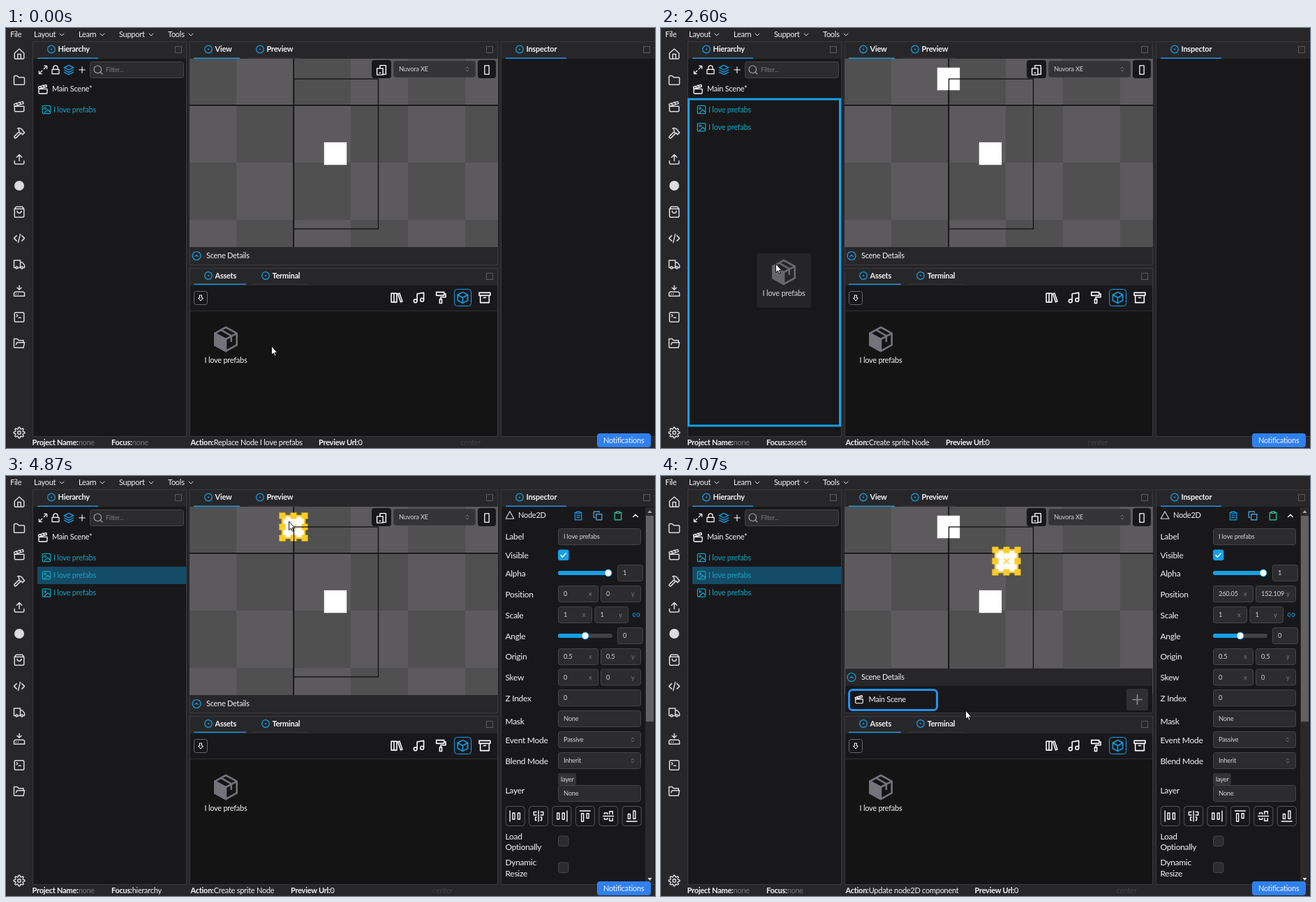
Write an HTML page that moves like this. It is 930 by 602 pixels and loops after 7800 ms.

```html
<!DOCTYPE html>
<html lang="en">
<head>
<meta charset="utf-8">
<title>Scene editor</title>
<style>
html, body { margin: 0; width: 100%; height: 100%; overflow: hidden; background: #27272a; }
svg { display: block; width: 100%; height: 100%; }
text { font: 11px Lato, "Open Sans", sans-serif; letter-spacing: -.024em; fill: #f4f4f5; white-space: pre; }
.b { font-weight: 700; }
.n { font-weight: 400; }
.s { font-size: 9.3px; fill: #d4d4d8; }
.l { font-size: 12px; }
.dim { fill: #77777c; }
.cy { fill: #10a5bf; }
</style>
</head>
<body>
<svg id="stage" viewBox="0 0 930 602" xmlns="http://www.w3.org/2000/svg"></svg>
<script>
const BLUE = '#16a0e6', BAR = '#27272a', BODY = '#18181b', EDGE = '#3a3a3d', FIELD = '#2c2c2f', YELLOW = '#ffcb25';

const disc = (x, y, r) => `M${x + r} ${y}a${r} ${r} 0 1 1 ${-2 * r} 0 ${r} ${r} 0 0 1 ${2 * r} 0`;
const box = (x, y, w, h) => `M${x} ${y}h${w}v${h}h${-w}z`;

function gear() {
  let d = '';
  for (let i = 0; i < 64; i++) {
    const a = i * Math.PI / 32, r = 9 + 1.5 * Math.tanh(2.5 * Math.cos(8 * a));
    d += (i ? 'L' : 'M') + (12 + r * Math.cos(a)).toFixed(2) + ' ' + (12 + r * Math.sin(a)).toFixed(2);
  }
  return d + 'Z' + disc(12, 12, 3);
}

// Icons on a 24 unit grid
const icons = {
  home: 'M9 21v-9h6v9M3 10l9-8 9 8v9a2 2 0 0 1-2 2H5a2 2 0 0 1-2-2z',
  folder: 'M4 20a2 2 0 0 1-2-2V5a2 2 0 0 1 2-2h4l3 3h9a2 2 0 0 1 2 2v10a2 2 0 0 1-2 2z',
  clap: 'M20 6 3 11l-1-4 17-5zM6 5l3 4M12 3l3 4M3 11h18v8a2 2 0 0 1-2 2H5a2 2 0 0 1-2-2z',
  hammer: 'M15 12l-9 9a2 2 0 0 1-3-3l9-9M18 15l4-4-3-3V7l-3-3q-3-2-7-1 3 2 3 5v2l2 2h2z',
  upload: 'M21 15v4a2 2 0 0 1-2 2H5a2 2 0 0 1-2-2v-4M17 8l-5-5-5 5M12 3v12',
  bag: 'M6 2 3 6v14a2 2 0 0 0 2 2h14a2 2 0 0 0 2-2V6l-3-4zM3 6h18M16 10a4 4 0 0 1-8 0',
  code: 'M17 17l5-5-5-5M7 7l-5 5 5 5M14 4l-4 16',
  truck: 'M5 18H2V4h12v14M15 18H9M19 18h3v-5l-4-5h-4' + disc(17, 18, 2) + disc(7, 18, 2),
  drive: 'M12 2v8M16 6l-4 4-4-4M4 14h16l2 2v6H2v-6zM6 18h.1M10 18h.1',
  term: 'M7 11l2-2-2-2M11 13h4M5 3h14a2 2 0 0 1 2 2v14a2 2 0 0 1-2 2H5a2 2 0 0 1-2-2V5a2 2 0 0 1 2-2z',
  open: 'M6 14l2-4h14l-2 10H4a2 2 0 0 1-2-2V3h6l3 3h9v4',
  gear: gear(),
  expand: 'M15 3h6v6M21 3l-7 7M9 21H3v-6M3 21l7-7',
  lock: 'M4 11h16v10H4zM7 11V7a5 5 0 0 1 10 0v4',
  layers: 'M12 2l10 5-10 5L2 7zM2 12l10 5 10-5M2 17l10 5 10-5',
  plus: 'M12 4v16M4 12h16',
  search: disc(11, 11, 8) + 'M21 21l-4.5-4.5',
  image: 'M5 3h14a2 2 0 0 1 2 2v14a2 2 0 0 1-2 2H5a2 2 0 0 1-2-2V5a2 2 0 0 1 2-2zM6 21l9-9 6 6' + disc(9, 9, 2),
  down: 'M6 9l6 6 6-6',
  up: 'M6 15l6-6 6 6',
  sort: 'M7 9l5-5 5 5M7 15l5 5 5-5',
  devices: 'M9 9V3h12v18h-6M3 9h12v13H3zM8 18h2',
  phone: 'M7 2h10v20H7z',
  drop: 'M9 4h6v8h4l-7 8-7-8h4z',
  books: box(2, 4, 5, 16) + box(7, 4, 5, 16) + 'M14 5l3-1 5 15-3 1z',
  music: 'M9 18V5l12-2v13' + disc(6, 18, 3) + disc(18, 16, 3),
  roller: box(4, 2, 14, 6) + 'M18 5h3v6h-9v4' + box(10, 15, 4, 7),
  cube: 'M12 2l9 5v10l-9 5-9-5V7zM3 7l9 5 9-5M12 12v10',
  archive: box(2, 3, 20, 5) + 'M4 8v13h16V8M10 12h4',
  tri: 'M12 3l10 18H2z',
  clip: 'M8 4H4v18h16V4h-4' + box(8, 2, 8, 4),
  lines: 'M8 4H4v18h16V4h-4M8 11h8M8 16h8' + box(8, 2, 8, 4),
  copy: box(8, 8, 14, 14) + 'M16 4V2H2v14h3',
  link: 'M9 17H7A5 5 0 0 1 7 7h2M15 7h2a5 5 0 0 1 0 10h-2M8 12h8',
  check: 'M4 12l5 6L20 6',
  left: 'M2 2v20' + box(7, 6, 4, 12) + box(17, 6, 4, 12),
  mid: 'M12 2v20M8 4H3v6h5M16 4h5v6h-5M8 14H6v6h2M16 14h2v6h-2',
  top: 'M2 2h20' + box(5, 7, 4, 15) + box(15, 7, 4, 9)
};

const R = (x, y, w, h, fill, more = '') => `<rect x="${x}" y="${y}" width="${w}" height="${h}" fill="${fill}" ${more}/>`;
const T = (x, y, s, cls = '', more = '') => `<text x="${x}" y="${y}" class="${cls}" ${more}>${s}</text>`;
const P = (d, stroke, w = 1, fill = 'none') => `<path d="${d}" fill="${fill}" stroke="${stroke}" stroke-width="${w}" stroke-linejoin="round"/>`;
const G = (id, s) => `<g id="${id}">${s}</g>`;
const I = (name, x, y, size = 18, color = '#dcdcdf', w = 2, turn = 0) =>
  `<g transform="translate(${x} ${y}) rotate(${turn}) scale(${size / 24}) translate(-12 -12)"><path d="${icons[name]}" fill="none" stroke="${color}" stroke-width="${w}" stroke-linecap="round" stroke-linejoin="round"/></g>`;
const framed = (x, y, w, h, fill = FIELD, edge = '#454548', r = 3) => R(x + .5, y + .5, w - 1, h - 1, fill, `stroke="${edge}" rx="${r}"`);

const panel = (x, y, w, h) => R(x + .5, y + .5, w - 1, h - 1, BODY, `stroke="${EDGE}"`) + R(x + 1, y + 1, w - 2, 24, BAR);
const tab = (x, y, s) => `<circle cx="${x}" cy="${y}" r="5.3" fill="none" stroke="${BLUE}" stroke-width="1.2"/><circle cx="${x}" cy="${y}" r="1.1" fill="${BLUE}"/>` + T(x + 9.5, y + 3.5, s, 'b');
const underline = (x, y, w) => R(x, y - .4, w, 1.4, BLUE);
const maxBox = (x, y) => R(x + .5, y + .5, 9, 9, 'none', 'stroke="#5c5c60"');

function shell() {
  let s = R(0, 0, 930, 602, BAR) + T(6, 12.5, 'File');
  [['Layout', 40, 80], ['Learn', 104, 138], ['Support', 162, 208], ['Tools', 232, 265]]
    .forEach(([n, x, c]) => s += T(x, 12.5, n) + I('down', c, 9.5, 12));
  ['home', 'folder', 'clap', 'hammer', 'upload', '', 'bag', 'code', 'truck', 'drive', 'term', 'open'].forEach((n, i) => {
    const y = 37.5 + i * 37.7;
    s += n ? I(n, 19, y) : `<circle cx="19" cy="${y}" r="7" fill="#dcdcdf"/>`;
  });
  return s + I('gear', 19, 580);
}

function hierarchy() {
  let s = panel(38, 19, 221, 567) + tab(65, 30.5, 'Hierarchy') + maxBox(242, 26) + underline(45, 43, 87);
  s += I('expand', 53, 60, 15, '#fff') + I('lock', 71, 60, 15, '#fff') + I('layers', 90, 60, 16, BLUE) + I('plus', 109, 60, 13, '#fff');
  s += framed(120, 48, 135, 24) + I('search', 132, 60, 16, '#aaa', 1.6) + T(143, 62.5, 'Filter...', 's dim');
  s += I('clap', 53, 88, 16, '#fff') + T(66, 91, 'Main Scene*');
  s += R(45, 130, 213.5, 25, '#144b66', 'id="row"');
  [0, 1, 2].forEach(i => s += G('node' + i, I('image', 58, 117 + 25.2 * i, 15, '#10a5bf') + T(68, 120.5 + 25.2 * i, 'I love prefabs', 'cy')));
  return s + R(39.5, 102, 217, 468, 'none', `id="outline" stroke="${BLUE}" stroke-width="3"`);
}

const square = (x, y) => R(x - 16.2, y - 16.2, 32.4, 32.4, '#fff');

function gizmo() {
  let s = square(0, 0) + R(-16, -16, 32, 32, 'none', `stroke="${YELLOW}" stroke-width="2.5"`);
  for (const x of [-16, 0, 16]) for (const y of [-16, 0, 16])
    if (x || y) s += R(x - 4.5, y - 4.5, 9, 9, YELLOW);
  return s + P('M-4-4L4 4M4-4L-4 4', YELLOW, 1.5);
}

function view() {
  let s = panel(263, 19, 442, 321) + R(263, 44, 442, 270, '#505050'), grid = '';
  for (let r = 0; r < 4; r++) for (let c = 0; c < 6; c++)
    if ((r + c) % 2) grid += R(248 + 82 * c, 29 + 82 * r, 82, 82, '#5c5a5d');
  grid += P('M263 110.7H705M412.2 44V314', '#0a0a0a', 1.5) + square(472, 180);
  grid += G('copyA', square(412, 73));
  grid += G('gizmo', gizmo()) + R(412.5, 73, 121, 215, 'none', 'stroke="#111" stroke-width="1.3"');
  s += `<clipPath id="area">${R(263, 44, 442, 270, '#000')}</clipPath><g clip-path="url(#area)">${grid}</g>`;
  s += tab(290, 30.5, 'View') + tab(364, 30.5, 'Preview') + maxBox(688, 26) + underline(269, 43, 66) + R(346, 42.5, 77, 1, '#39393c');
  s += R(524, 46, 28, 26, BODY, 'rx="4"') + I('devices', 538, 60, 17, '#fff');
  s += framed(555, 47, 118, 24, '#343437', '#3e3e41') + T(563, 62, 'Nuvora XE', 's') + I('sort', 661, 59, 9, '#88888c');
  s += R(676, 46, 26, 26, BODY, 'rx="4"') + I('phone', 689, 60, 15, '#fff');
  const head = `<circle cx="273" cy="12.5" r="6" fill="none" stroke="${BLUE}" stroke-width="1.2"/>` + I('up', 273, 12.5, 9, BLUE, 3) + T(287, 16, 'Scene Details');
  s += G('shut', `<g transform="translate(0 314)">${R(264, 0, 440, 25, BAR)}${head}</g>`);
  return s + G('wide', `<g transform="translate(0 276)">${R(264, 0, 440, 63, BODY)}${R(264, 0, 440, 25, BAR)}${head}</g>`
    + R(269.5, 306.5, 126, 29, BODY, 'stroke="#2492ee" stroke-width="3" rx="5"') + I('clap', 284, 320.5, 14, '#fff') + T(297.5, 324, 'Main Scene')
    + R(667, 305, 31, 31, '#303033', 'rx="3"') + I('plus', 682.5, 320.5, 20, '#8a8a8e'));
}

// Origin is the top left corner of the 78px tile
const prefab = () => `<g transform="translate(39 27)">`
  + P('M-15.700-8.400L0 0V17L-15.700 8.400Z', '#74737a', 2.6, '#74737a')
  + P('M0-17L15.700-8.400V8.400L0 17-15.700 8.400V-8.400ZM0 0L15.700-8.400M-6.200-12.800L7.800-4.800V3.900', '#74737a', 2.6) + '</g>'
  + T(39, 61, 'I love prefabs', '', 'text-anchor="middle"');

function assets() {
  let s = panel(263, 344, 442, 242) + R(264, 406, 440, 179, '#141414') + R(264, 405, 440, 1, '#303033');
  s += tab(290, 355, 'Assets') + tab(372, 355, 'Terminal') + maxBox(688, 351) + underline(269, 367, 75) + R(353, 366.5, 80, 1, '#39393c');
  s += framed(269, 377, 20, 20, BODY, '#67676b') + I('drop', 279, 387, 12, '#fff');
  ['books', 'music', 'roller', 'cube', 'archive'].forEach((n, i) => s += I(n, 560 + 31.5 * i, 386.5, 19, i == 3 ? BLUE : '#fff'));
  s += R(642.5, 374.5, 24, 24, 'none', `stroke="${BLUE}" rx="4"`);
  return s + R(276, 419, 78, 78, '#222225', 'id="hover" rx="4"') + `<g transform="translate(276 419)">${prefab()}</g>`;
}

const field = (x, y, w, val, axis = '', id = '') => framed(x, y - 12, w, 24) + T(x + 8, y + 3, val, 's', id && `id="${id}"`) + (axis && T(x + w - 14, y + 3, axis, 's dim'));
const pick = (y, val) => field(791, y, 119, val) + I('sort', 898, y, 9, '#88888c');
const slide = (y, end, at) => R(791, y - 3, end - 791, 6, '#424246', 'rx="3"') + R(791, y - 3, at - 791, 6, BLUE, 'rx="3"')
  + `<circle cx="${at}" cy="${y}" r="5" fill="#fff" stroke="${BLUE}"/>`;

function inspector() {
  let s = I('tri', 722, 56, 14) + T(734, 60, 'Node2D') + I('lines', 820, 57, 14, BLUE) + I('copy', 848, 57, 14, '#5aaeea') + I('clip', 877, 57, 14, '#34d399') + I('up', 902, 57, 14, '#fff');
  [['Label', 87], ['Visible', 114], ['Alpha', 140], ['Position', 169.5], ['Scale', 199.5], ['Angle', 229.5], ['Origin', 259], ['Skew', 289],
    ['Z Index', 319], ['Mask', 352], ['Event Mode', 379], ['Blend Mode', 408.5], ['Layer', 450.5], ['Load', 516.5], ['Optionally', 532], ['Dynamic', 554], ['Resize', 569.5]]
    .forEach(([n, y]) => s += T(715.5, y + 4, n, 'l'));
  s += field(791, 87, 119, 'I love prefabs') + R(791, 105.5, 15.5, 15.5, BLUE, 'rx="3"') + I('check', 798.7, 113.5, 11, '#fff', 3);
  s += slide(139, 863, 863) + field(876, 139, 37, '1') + slide(229, 869, 830) + field(876, 229, 37, '0');
  s += field(791, 169, 58, '0', 'x', 'posX') + field(852, 169, 58, '0', 'y', 'posY');
  s += field(791, 199, 49, '1', 'x') + field(843.5, 199, 48.5, '1', 'y') + I('link', 903, 199, 12, BLUE);
  [['0.5', 259], ['0', 288.5]].forEach(([v, y]) => s += field(791, y, 58, v, 'x') + field(852, y, 58, v, 'y'));
  s += field(791, 318, 119, '0') + field(791, 348, 119, 'None') + pick(378, 'Passive') + pick(408, 'Inherit');
  s += R(791, 426, 26, 17, '#333336', 'rx="2"') + T(795, 437.5, 'layer', 's') + field(791, 455, 119, 'None');
  [['left', 0], ['mid', 0], ['left', 180], ['top', 0], ['mid', 90], ['top', 180]].forEach(([n, a], i) => {
    const x = 729.2 + 33.4 * i;
    s += framed(x - 13.5, 473, 28, 29, BODY, '#55555a', 4) + I(n, x + .5, 487.5, 18, '#fff', 1.8, a);
  });
  s += framed(791, 515.5, 15.5, 15.5) + framed(791, 553.5, 15.5, 15.5);
  s += R(916, 45, 13, 540, '#2a2a2c') + R(917, 57, 11, 295, '#626264') + P('M919.500 53h6l-3-4z', 'none', 0, '#aaa') + P('M919.500 576h6l-3 4z', 'none', 0, '#ddd');
  return panel(709, 19, 222, 567) + tab(736, 30.5, 'Inspector') + maxBox(913, 26) + underline(716, 43, 87) + G('props', s);
}

// A bold label followed directly by its value
const pair = (x, label, val, id, cls = '') => T(x, 597.5, `${label}<tspan id="${id}" class="n ${cls}">${val}</tspan>`, 'b');

function status() {
  return pair(37.5, 'Project Name:', 'none', 'project', 'dim') + pair(151, 'Focus:', '', 'focus') + pair(264.5, 'Action:', '', 'action')
    + G('tail', pair(0, 'Preview Url:', '0', 'url') + T(203, 597.5, 'center', '', 'style="fill:#414145"'))
    + R(847, 581, 77, 20, '#2f80f2', 'rx="4"') + T(856, 594.5, 'Notifications');
}

const arms = [0, 90, 180, 270].map(a => `<path transform="rotate(${a})" d="M-1 0V-4.500H-3.500L0-8.500 3.500-4.500H1V0"/>`).join('');
const pointers = G('ghost', R(0, 0, 78, 78, '#252529', 'rx="4"') + `<g opacity=".85">${prefab()}</g>`)
  + G('arrow', P('M.5 0V12.500L3.400 9.900 5.200 14.200 7 13.400 5.200 9.200H8.800Z', '#000', .9, '#fff'))
  + G('move', `<g fill="#fff" stroke="#111" stroke-width="1.800">${arms}</g><g fill="#fff">${arms}</g>`);

stage.innerHTML = shell() + hierarchy() + view() + assets() + inspector() + status() + pointers;

// Pointer path: time, x, y
const path = [
  [0, 380, 456], [60, 380, 456], [330, 325, 453], [470, 325, 453], [530, 324, 454], [610, 324, 454], [670, 300, 443], [1000, 205, 376], [1330, 150, 330],
  [1610, 150, 330], [2000, 303, 434], [2130, 303, 434], [2400, 190, 350], [2600, 164, 338], [2740, 164, 338], [3000, 380, 150],
  [3130, 453, 85], [3200, 425, 70], [3400, 415, 68], [3670, 415, 68], [4270, 100, 143], [4410, 100, 143], [4870, 405, 65],
  [5070, 405, 65], [5300, 424, 78], [5600, 404, 85], [5740, 404, 85], [6130, 487, 134], [6340, 487, 134], [6740, 430, 326], [6870, 430, 326], [7070, 436, 336]
];

function pointerAt(t) {
  const i = path.findIndex(k => k[0] > t);
  if (i < 0) return path[path.length - 1].slice(1);
  const [a, b] = [path[i - 1], path[i]], f = (t - a[0]) / (b[0] - a[0]);
  return [1, 2].map(n => Math.round(a[n] + (b[n] - a[n]) * f));
}

const el = id => document.getElementById(id);
const show = (id, on) => el(id).style.display = on ? '' : 'none';
const place = (id, x, y) => el(id).setAttribute('transform', `translate(${x} ${y})`);
const say = (id, s) => { if (el(id).textContent !== s) el(id).textContent = s; };
const within = (t, a, b) => t >= a && t < b;
const STEP = 200 / 3;

function draw(now) {
  const t = Math.floor((now % 7800) / STEP + .06) * STEP + 4;
  const [x, y] = pointerAt(t);
  const first = within(t, 670, 1470), drag = first || within(t, 2130, 2730);
  const picked = t >= 4470, moving = within(t, 5260, 6460), done = t >= 6400, wide = t >= 6870;

  show('ghost', drag);
  place('ghost', x - 27, y - (first ? 26 : 15));
  show('outline', drag && x < 258);
  show('hover', !drag && within(x, 276, 354) && within(y, 419, 497));
  show('arrow', !moving);
  show('move', moving);
  place('arrow', x, y);
  place('move', x, y);

  show('node1', t >= 1470);
  show('node2', t >= 2730);
  show('copyA', t >= 1470);
  show('row', picked);
  show('props', picked);
  show('gizmo', picked);
  if (t < 5800) place('gizmo', 412, 73);
  else if (!done) place('gizmo', x + 8, y - 12);
  else place('gizmo', 495, 122);
  show('shut', !wide);
  show('wide', wide);

  const focus = within(t, 530, 3670) ? 'assets' : within(t, 4470, 5600) ? 'hierarchy' : 'none';
  say('focus', focus);
  el('focus').setAttribute('class', focus == 'none' ? 'n dim' : 'n');
  say('action', t < 1470 ? 'Replace Node I love prefabs' : done ? 'Update node2D component' : 'Create sprite Node');
  place('tail', t < 1470 ? 448 : done ? 449.5 : 408, 0);
  say('posX', done ? '260.05' : '0');
  say('posY', done ? '152.109' : '0');
}

const start = performance.now();
function tick() {
  draw(performance.now() - start);
  requestAnimationFrame(tick);
}
tick();
</script>
</body>
</html>
```
